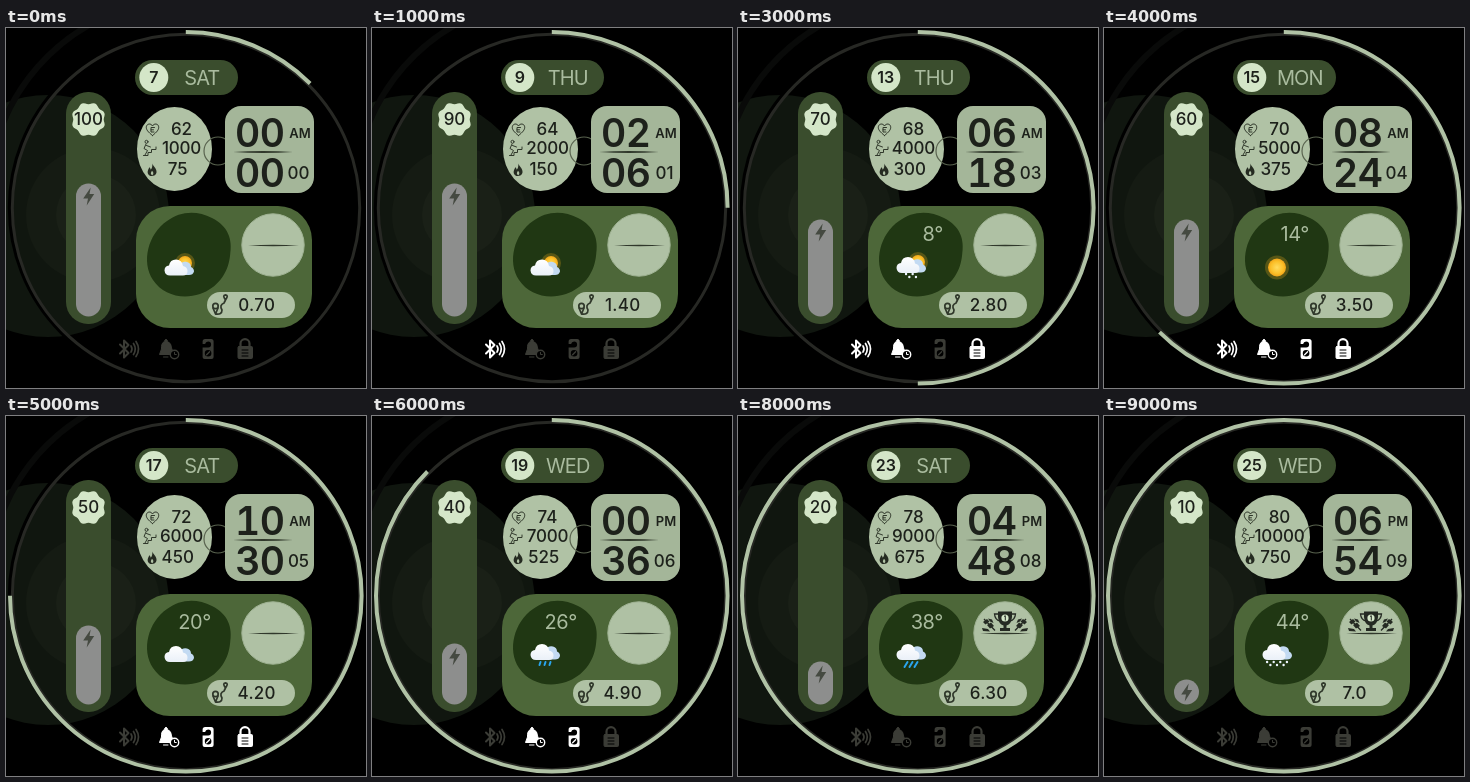
Recreate the animation shown at these times as an HTML page. Size 360 by 360 pixels, loop 10000 ms.

```html
<!DOCTYPE html>
<html lang="en">
<head>
<meta charset="utf-8">
<title>Green watch face</title>
<style>
  html, body { margin: 0; width: 100%; height: 100%; overflow: hidden; background: #000; }
  svg { display: block; width: 100vw; height: 100vh; }
  text { font-family: Inter, Roboto, sans-serif; font-weight: 500; font-size: 17px; fill: #1d211b; text-anchor: middle; }
  .badge { font-weight: 600; }
  .big { font-size: 39px; font-weight: 600; letter-spacing: -.5px; font-variant-numeric: tabular-nums; }
  .thin { font-size: 20px; font-weight: 400; fill: #a9bb9e; }
  .line { fill: none; stroke: #30382b; stroke-width: 1; stroke-linecap: round; stroke-linejoin: round; }
  #status > g { color: #3b3c36; }
  #status > g.on { color: #fff; }
</style>
</head>
<body>
<svg viewBox="0 0 360 360">
  <defs>
    <radialGradient id="sunFill">
      <stop offset="0" stop-color="#ffdc5e"/><stop offset=".7" stop-color="#fbbf27"/><stop offset="1" stop-color="#f0a41a"/>
    </radialGradient>
    <linearGradient id="cloudFill" x2="0" y2="1">
      <stop offset="0" stop-color="#fff"/><stop offset="1" stop-color="#eaf0f8"/>
    </linearGradient>
  </defs>

  <rect width="360" height="360" fill="#000"/>
  <circle cx="42" cy="188" r="121" fill="#10160f"/>
  <circle cx="87" cy="187" r="67" fill="#151b13"/>
  <circle cx="90" cy="187" r="40" fill="#1a2017"/>
  <g fill="none">
    <path d="M-3 95A200 200 0 0 1 83-3" stroke="#090a09" stroke-width="6"/>
    <circle cx="179.8" cy="179.8" r="176" stroke="#000" stroke-width="4"/>
    <circle cx="180" cy="180" r="173.7" stroke="#272824" stroke-width="3"/>
    <circle id="ring" cx="179.8" cy="179.8" r="175.8" stroke="#b0c2a5" stroke-width="4" pathLength="360" transform="rotate(-90 179.8 179.8)"/>
  </g>

  <rect x="129" y="32" width="103" height="35" rx="17.5" fill="#3a4d2d"/>
  <circle cx="147.8" cy="49.5" r="14.5" fill="#d4e6c8"/>
  <text id="day" class="badge" x="147.8" y="55.2" style="font-size:16px"></text>
  <text id="weekday" class="thin" x="195.800" y="56.7" style="letter-spacing:-.9px"></text>

  <rect x="60" y="64" width="45" height="232" rx="22" fill="#3a4d2d"/>
  <path id="scallop" fill="#d4e6c8"/>
  <text id="battery" x="82.5" y="97.2"></text>
  <rect id="bar" x="70" width="25" rx="12.5" fill="#8d8e8d"/>
  <path id="bolt" d="M2-9-5.500 2H-.7L-2 9 5.500-2.500H.8Z" fill="#454a41"/>

  <ellipse cx="168.5" cy="121" rx="37.5" ry="42" fill="#b0c2a5"/>
  <circle cx="212" cy="123" r="14" fill="none" stroke="#59634f" stroke-width="1.2"/>
  <rect x="219" y="78" width="89" height="87" rx="16" fill="#a4b699"/>
  <g class="line">
    <path d="M146.500 107.500C142 104 140 101.500 140.300 98.800 140.800 95.500 145 95 146.500 98 148 95 152.300 95.500 152.700 98.800 153 101.500 151 104 146.500 107.500ZM148.500 99.500H145V104H148M145 101.800H147.500"/>
    <circle cx="140.500" cy="113.800" r="1.500"/>
    <path d="M140 116 138 120.500 141.500 122.500 139 127M140.500 117.500 144.500 119M137.500 127.500H142V124.500H145.500V121.500H150V119"/>
  </g>
  <path d="M146.300 135.500C147.500 139 151 140.500 150.500 144.500 150 148.800 142.500 149.500 141.700 145 141.300 142.500 142.800 141 143.300 139.300 144.200 140 144.600 140.800 144.700 141.800 146.200 140 146.500 138 146.300 135.500Z" fill="#252b21"/>
  <path d="M146 142.800Q148.600 145.200 146.300 147.300 143.600 145.800 146 142.800Z" fill="#b0c2a5"/>
  <text id="heart" x="175.500" y="107"></text>
  <text id="steps" x="175.500" y="126.200" style="letter-spacing:-.2px"></text>
  <text id="calories" x="171.700" y="147.200"></text>

  <text id="hour" class="big" x="253.700" y="118.700"></text>
  <text id="minute" class="big" x="253.700" y="158.700"></text>
  <path d="M227 124Q257 121.800 287 124 257 126.200 227 124Z" fill="#30382b"/>
  <text id="half" class="badge" x="294" y="109.800" style="font-size:13px"></text>
  <text id="second" x="292.500" y="151.300"></text>

  <rect x="130" y="178" width="176" height="122" rx="34" fill="#4d6739"/>
  <path d="M161 193C174 183 191 182 206 190 222 198 227 211 224 228 222 246 211 260 194 266 176 272 157 267 147 252 135 234 142 206 161 193Z" fill="#203713"/>
  <text id="temp" class="thin" x="204.800" y="213" style="text-anchor:end;letter-spacing:-.5px"></text>
  <g id="weather"></g>

  <circle cx="267" cy="217" r="31.200" fill="#afc1a4" stroke="#9fb293"/>
  <path d="M242 217.500Q267 215.800 293 217.500 267 219 242 217.500Z" fill="#30382b"/>
  <g id="trophy" fill="#252a23">
    <path d="M260 195.500H274V201Q273.500 208 268.500 209.500V212H272V215H262V212H265.500V209.500Q260.500 208 260 201Z"/>
    <path d="M260 198H256.500Q257 204 262 205M274 198H277.500Q277 204 272 205M246 203 257 214.500M288 203 277 214.500" fill="none" stroke="#252a23" stroke-width="1.300"/>
    <path id="flag" d="M245 206 249 203 251.500 205.500 247.500 208.500ZM250 202.500 254 203.500 255.500 207 252 205.500ZM249 209 253 206.500 256 210 252 212.500ZM244 212 250 213 252 215.500 245 215Z"/>
    <use href="#flag" transform="matrix(-1 0 0 1 534 0)"/>
    <circle cx="267" cy="202" r="3.600" fill="#d4e6c8"/>
    <path d="M266 200.500 267.300 199.700V204.500" fill="none" stroke="#252a23"/>
  </g>

  <rect x="201" y="264" width="88" height="26" rx="13" fill="#afc1a4"/>
  <g class="line" style="stroke-width:1.700">
    <circle cx="209.500" cy="278" r="2.700"/>
    <path d="M207 280 209.500 286 212 280M209.500 286Q216 287 216 282 213 277 218 275L219.500 272M219.500 272Q216 267 219.500 266.800 223 267 219.500 272"/>
  </g>
  <text id="distance" x="250.700" y="283.300" style="letter-spacing:.3px"></text>

  <g id="status" fill="none" stroke="currentColor" stroke-linecap="round" stroke-linejoin="round">
    <g>
      <path d="M114 316.500 122.500 325 118 329.500V312.500L122.500 317 114 325.500" stroke-width="2"/>
      <path d="M125 318Q127 321 125 324M127.500 315.500Q131 321 127.500 326.500M130 313.500Q135 321 130 328.500" stroke-width="1.700"/>
    </g>
    <g>
      <path d="M160 311.500Q161.500 311.500 161.500 313.500 165.500 315 165.500 320L168 326.500H153.500L155.500 321Q155 315 158.500 313.500 158.500 311.500 160 311.500ZM157.500 329H162" fill="currentColor"/>
      <circle cx="168.500" cy="326.500" r="4.200" fill="#000" stroke-width="1.400"/>
      <path d="M168.500 324.300V326.500H170.300"/>
    </g>
    <g transform="translate(.6 0)">
      <path fill="currentColor" stroke="none" fill-rule="evenodd" d="M198.500 311H204.500Q207 311 207 313.500V329Q207 331 205 331H198Q196 331 196 329V319.500H201.500Q204.500 319.500 204.500 316.500 204.500 313.500 201.500 313.500 199 313.500 198.500 316H196V313.500Q196 311 198.500 311ZM201.500 322A3.300 3.300 0 1 0 201.500 328.600 3.300 3.300 0 1 0 201.500 322Z"/>
      <path d="M200 326.700 203 323.800" stroke-width="1.300"/>
    </g>
    <g>
      <path d="M234.500 318V315.500A4.500 4.300 0 0 1 243.500 315.500V318" stroke-width="2.200"/>
      <rect x="232" y="318.500" width="14.500" height="12" rx="1" fill="currentColor"/>
      <path d="M236 322H242M236 325H242M236 328H242" stroke="#000" stroke-width="1"/>
    </g>
  </g>
</svg>

<script>
const STEP = 1000, COUNT = 10, GOAL = 8000;
const byId = id => document.getElementById(id);
const pad = n => String(n).padStart(2, '0');
const setText = values => {
  for (const id in values) byId(id).textContent = values[id];
};

const sun = (x, y, r) =>
  `<circle cx="${x}" cy="${y}" r="${r + 3}" fill="#f8b51f" opacity=".25"/>
   <circle cx="${x}" cy="${y}" r="${r}" fill="url(#sunFill)"/>`;

const cloud = y => `<g transform="translate(0 ${y})">
  <path d="M172 9Q170 1 174-1 176-5 181-4 185-3 185 1 188 2 188 5.500 187 9 183 9Z" fill="#c3daf2"/>
  <path d="M164 9.500Q159 9.500 158.500 4.500 158.500 0 163-.5 164-6.500 170-6.500 176-6.500 177 0 181.500 1 181.500 5 181.500 9.500 177 9.500Z" fill="url(#cloudFill)"/></g>`;

const each = (n, draw) => Array.from({ length: n }, (_, i) => draw(i)).join('');
const rain = (n, length, slant) => each(n, i => {
  const x = 173 + (i - (n - 1) / 2) * 5;
  return `<path d="M${x + slant} 246 ${x - slant} ${246 + length}" stroke="#2aa5ee" stroke-width="2" stroke-linecap="round"/>`;
});
const snow = n => each(n, i =>
  `<circle cx="${173 + (i - (n - 1) / 2) * 3.3}" cy="${246 + i % 2 * 3}" r="1.2" fill="#eef5ff"/>`);

const partly = sun(179, 235, 7) + cloud(238);
const showers = sun(180, 234, 7) + cloud(235.5);
const overcast = cloud(236.5), wet = cloud(234.5);
const skies = [
  partly,
  showers + rain(3, 4, 1),
  showers + snow(4),
  sun(173, 239.5, 9),
  overcast,
  wet + rain(3, 3, .5),
  wet + snow(4),
  wet + rain(3, 5, 1.5),
  wet + snow(7)
];

const scallop = each(64, i => {
  const a = i / 64 * 2 * Math.PI, r = 16.2 - Math.cos(8 * a);
  return `${i ? 'L' : 'M'}${(82.5 + r * Math.sin(a)).toFixed(2)} ${(91.5 - r * Math.cos(a)).toFixed(2)}`;
});
byId('scallop').setAttribute('d', scallop + 'Z');

// Order: bluetooth, alarm, do not disturb, lock; each stays lit for four steps.
const litFrom = [1, 3, 4, 2];

function show(i) {
  const steps = 1000 * (i + 1), battery = 100 - 10 * i, degrees = 6 * i - 10;
  const date = new Date(2023, i, 7 + 2 * i);
  setText({
    day: date.getDate(),
    weekday: ['SUN', 'MON', 'TUE', 'WED', 'THU', 'FRI', 'SAT'][date.getDay()],
    battery, steps,
    heart: 62 + 2 * i,
    calories: 75 * (i + 1),
    hour: pad(2 * i % 12),
    minute: pad(6 * i),
    second: pad(i),
    half: i < 6 ? 'AM' : 'PM',
    temp: degrees < 0 ? '' : degrees + '°',
    distance: (.7 * (i + 1)).toFixed(i < 9 ? 2 : 1)
  });

  const height = 25 + 18 * (Math.ceil(battery * 7 / 100) - 1), top = 288.5 - height;
  byId('bar').setAttribute('y', top);
  byId('bar').setAttribute('height', height);
  byId('bolt').setAttribute('transform', `translate(82.7 ${top + 13})`);

  const sweep = Math.min(360, steps / GOAL * 360);
  byId('ring').setAttribute('stroke-dasharray', sweep < 360 ? `${sweep} 360` : 'none');
  byId('trophy').style.display = steps >= GOAL ? '' : 'none';
  byId('weather').innerHTML = skies[Math.max(0, i - 1)];
  [...byId('status').children].forEach((icon, k) =>
    icon.classList.toggle('on', i >= litFrom[k] && i < litFrom[k] + 4));
}

const start = performance.now();
let shown = -1;
function tick() {
  const i = Math.floor(Math.max(0, performance.now() - start) / STEP) % COUNT;
  if (i !== shown) show(shown = i);
  requestAnimationFrame(tick);
}
tick();
</script>
</body>
</html>
```
